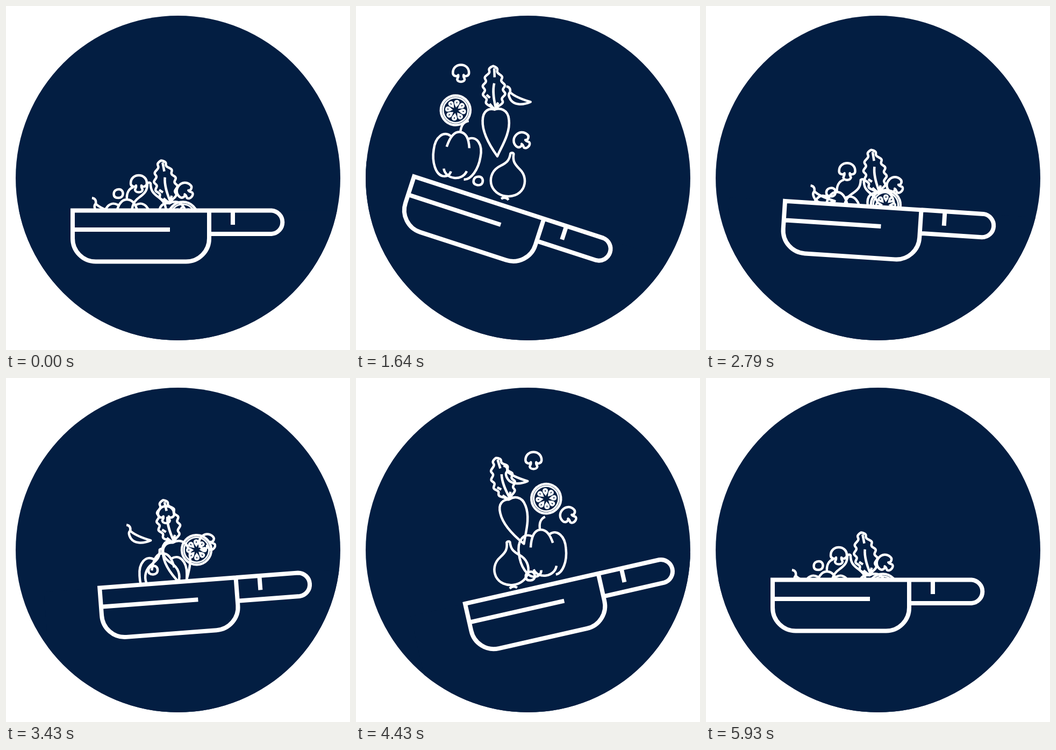
Recreate the animation shown at these times as an HTML page with a canvas. Size 640 px wide and 640 px high, loop 6000 ms.

```html
<!DOCTYPE html>
<html lang="en">
<head>
<meta charset="utf-8">
<title>Tossing pan</title>
<style>
  html, body { margin: 0; width: 100%; height: 100%; overflow: hidden; background: #fff; }
  canvas { display: block; width: 640px; height: 640px; }
</style>
</head>
<body>
<canvas id="stage" width="640" height="640"></canvas>
<script>
const ctx = document.getElementById('stage').getContext('2d');
const NAVY = '#031e42', WHITE = '#fff';
const LOOP = 6000, FPS = 14;
// Turning points of the two tosses, in steps of 1/14 s
const PEAK1 = 22, LANDING = 41, PEAK2 = 59.3, END = 83;
const DRIFT = 24;        // how far the food has moved right at the landing
const LEAN = 0.5;        // share of the pan's tilt that the food follows

const lerp = (a, b, k) => a + (b - a) * k;

// Linear motion through [step, x, y] or [step, x, y, angle] points
function along(points, step) {
  let i = 1;
  while (i < points.length - 1 && step > points[i][0]) i++;
  const from = points[i - 1], to = points[i];
  const k = (step - from[0]) / (to[0] - from[0]);
  return from.slice(1).map((v, n) => lerp(v, to[n + 1], k));
}

const panAt = step => along([[0, 320, 428, 0], [PEAK1, 276, 423, 18.9],
                             [PEAK2, 415.5, 423, -14.4], [END, 320, 423, 0]], step);

function foodAt({ rest, peak1, peak2 }, step) {
  const [x, y] = rest;
  const pos = along([[0, x, y], [PEAK1, ...peak1], [LANDING, x + DRIFT, y],
                     [PEAK2, ...peak2], [END, x, y]], step);
  // The first rise starts a little slowly
  if (step < PEAK1) pos[1] = lerp(y, peak1[1], (step / PEAK1) ** 1.17);
  return pos;
}

function leafPath() {
  const N = 70;
  const side = sign => Array.from({ length: N + 1 }, (_, i) => {
    const u = i / N;
    const width = 19 * Math.sin(Math.PI * u ** 0.85) ** 0.7 - 2.2 * Math.sin(10 * Math.PI * u);
    return `${(sign * Math.max(width || 0, 0)).toFixed(2)},${(-81 * u).toFixed(2)}`;
  });
  return 'M' + [...side(-1), ...side(1).reverse()].join('L') + 'Z';
}

const mushroom = new Path2D('M-5 4C-7 8-15 6-15 0C-15-20 15-20 15 0C15 6 7 8 5 4C4 8 7 10 7 12C6 18-6 18-7 12C-7 10-4 8-5 4Z');
const radish = new Path2D(leafPath() +
  'M2 87C-8 72-25 45-23 20C-22 0-10-3 0 0C10-3 25 0 26 20C28 45 10 70 2 87Z' +
  'M2-77V-60M1-49C-3-35-1-20 2-4M-14-28L-8-22M-9-11L0 0L7-13');
const pepper = new Path2D(
  'M-21-13C-17-36-9-44 0-44C9-44 17-36 21-17' +
  'M-17-34C-31-42-45-28-44-4C-44 20-33 41-20 42C-12 42-7 38-6 31' +
  'M17-34C31-42 45-28 44-4C44 20 33 41 20 42' +
  'M-20 28C-14 47 17 47 23 26M0-44C-1-55 3-64 12-67');
const onion = new Path2D(
  'M-3-51C-1-53 2-53 3-51C3-38 7-33 18-25C31-16 34-2 30 10C25 23 12 29 0 29' +
  'C-12 29-25 23-30 10C-34-2-31-16-18-25C-7-33-3-38-3-51ZM-7 35Q0 29 7 35');
const olive = new Path2D('M-8.5 1C-8.5-5-4-8 1-8C6-8 9-4 8.5 1C8 6 4 8 0 8C-5 8-8.5 6-8.5 1Z');
const chili = new Path2D('M0 0C6 1 8 5 7 11C13 17 22 22 45 29C29 36 14 34 8 25C5 20 3 14 7 11');
const seed = new Path2D('M0-5C-2-9-5-11-5-15C-5-21 5-21 5-15C5-11 2-9 0-5Z');
const pan = new Path2D(
  'M-196-47.5H58V4A43 43 0 0 1 15 47.5H-153A43 43 0 0 1-196 4Z' +
  'M58-47.5H174A21.8 21.8 0 0 1 174-4H58M102-46V-21M-196-12H-15');

function stroke(path, width) {
  ctx.lineWidth = width;
  ctx.stroke(path);
}

function ring(r, width) {
  ctx.lineWidth = width;
  ctx.beginPath();
  ctx.arc(0, 0, r, 0, 2 * Math.PI);
  ctx.stroke();
}

function drawTomato() {
  ring(27.5, 4.5);
  ring(23.2, 3);
  for (let i = 0; i < 8; i++) {
    ctx.fillStyle = WHITE;
    ctx.fill(seed);
    ctx.fillStyle = NAVY;
    ctx.fillRect(-0.8, -16, 1.6, 3);
    ctx.rotate(Math.PI / 4);
  }
}

function drawPan() {
  // Everything below the rim is hidden
  ctx.fillStyle = NAVY;
  ctx.fillRect(-300, -47.5, 600, 300);
  ctx.lineJoin = 'miter';
  stroke(pan, 8);
}

const food = [
  { shape: pepper, rest: [225, 404], peak1: [184, 271], peak2: [363, 316] },
  { shape: onion, rest: [266, 381], peak1: [282, 322], peak2: [292, 353] },
  { shape: radish, rest: [304, 367], peak1: [254, 183], peak2: [282, 208], angle: -11 },
  { shape: chili, rest: [160, 357], peak1: [285, 138], peak2: [289, 138], lean: 0 },
  { rest: [329, 392], peak1: [176, 183], peak2: [357, 203] },
  { shape: olive, rest: [209, 349], peak1: [227, 324], peak2: [339, 371] },
  { shape: mushroom, rest: [247, 330], peak1: [191, 113], peak2: [341, 130], lean: 0 },
  { shape: mushroom, rest: [333, 344], peak1: [306, 245], peak2: [403, 244], angle: -47, lean: 0 },
];

function place(x, y, deg, draw) {
  ctx.save();
  ctx.translate(x, y);
  ctx.rotate(deg * Math.PI / 180);
  draw();
  ctx.restore();
}

function render(ms) {
  const step = Math.min(END, Math.floor((ms % LOOP + 4) * FPS / 1000));
  const [panX, panY, tilt] = panAt(step);
  ctx.fillStyle = WHITE;
  ctx.fillRect(0, 0, 640, 640);
  ctx.save();
  ctx.beginPath();
  ctx.arc(320, 320, 302, 0, 2 * Math.PI);
  ctx.fillStyle = NAVY;
  ctx.fill();
  ctx.clip();
  ctx.strokeStyle = WHITE;
  ctx.lineJoin = 'round';
  for (const item of food) {
    const { shape, angle = 0, lean = LEAN } = item;
    place(...foodAt(item, step), angle + tilt * lean,
          shape ? () => stroke(shape, 4.5) : drawTomato);
  }
  place(panX, panY, tilt, drawPan);
  ctx.restore();
}

const start = performance.now();
function tick() {
  render(performance.now() - start);
  requestAnimationFrame(tick);
}
tick();
</script>
</body>
</html>
```
